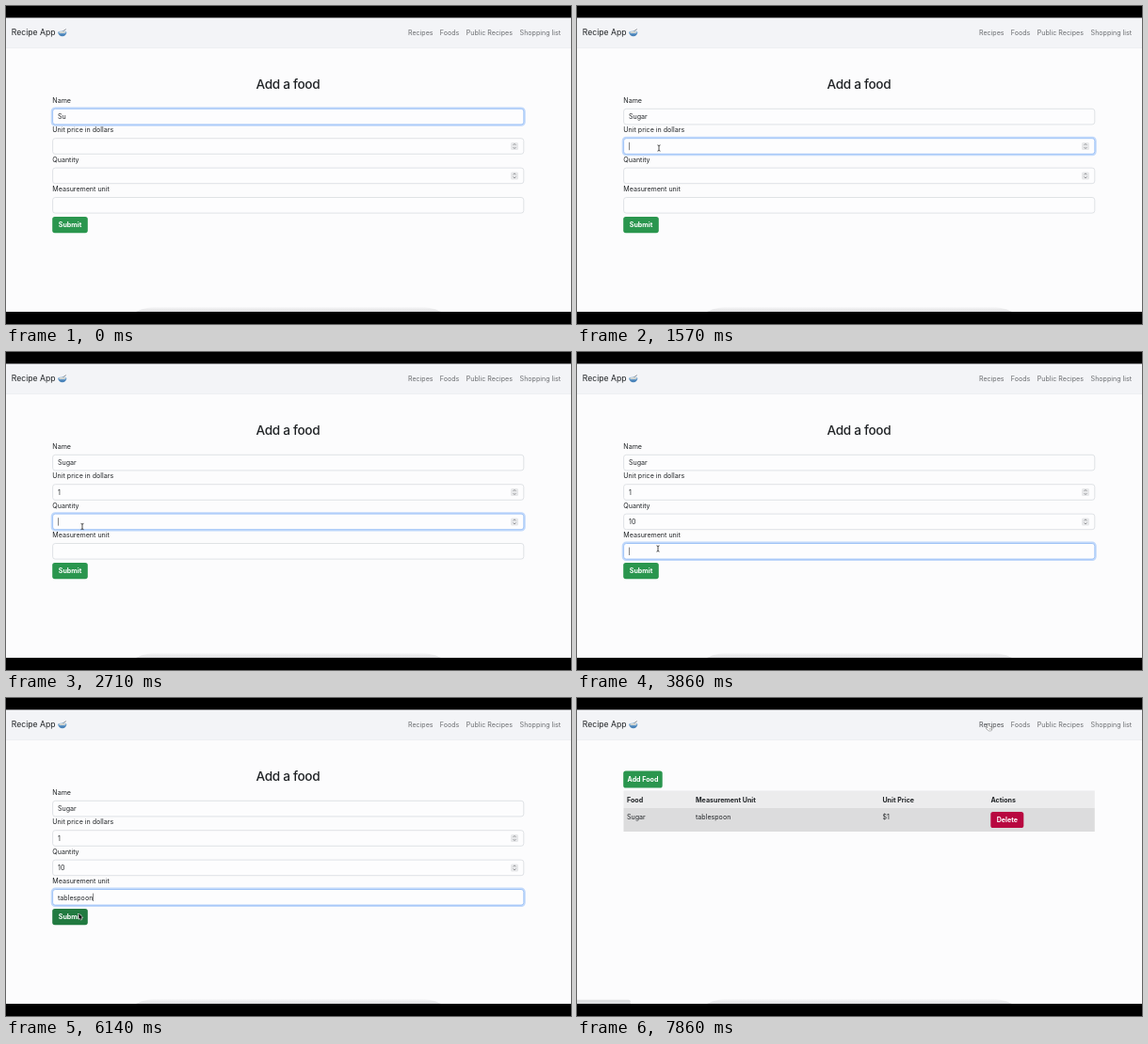
An HTML page with a canvas for the animation above (8000 ms loop, 600 by 338 pixels).

```html
<!DOCTYPE html>
<html lang="en">
<head>
<meta charset="utf-8">
<title>Recipe App</title>
<style>
html, body { margin: 0; width: 100%; height: 100%; overflow: hidden; background: #000; }
canvas { display: block; width: 600px; height: 338px; }
</style>
</head>
<body>
<canvas id="stage"></canvas>
<script>
const W = 600, H = 338, LOOP = 8000, STEP = 1000 / 7;
const canvas = document.getElementById('stage');
const ratio = window.devicePixelRatio || 1;
canvas.width = W * ratio;
canvas.height = H * ratio;
const ctx = canvas.getContext('2d');
ctx.scale(ratio, ratio);

const GREEN = '#2a964e', GREEN_DARK = '#217a40', RED = '#b80840', INK = '#212427';
const PAGE_SWITCH = 6290;

// Each field: label, vertical centre, focus interval, and [time, value] keystrokes.
const fields = [
  { label: 'Name', y: 117.6, from: 0, to: 1570,
    keys: [[0, 'Su'], [140, 'Sug'], [290, 'Suga'], [430, 'Sugar']] },
  { label: 'Unit price in dollars', y: 149, from: 1570, to: 2710, spinner: true,
    keys: [[0, ''], [1860, '1']] },
  { label: 'Quantity', y: 180.4, from: 2710, to: 3860, spinner: true,
    keys: [[0, ''], [3000, '1'], [3140, '10']] },
  { label: 'Measurement unit', y: 211.8, from: 3860, to: PAGE_SWITCH,
    keys: [[0, ''], [4140, 't'], [4430, 'ta'], [4570, 'tab'], [4710, 'tabl'], [5000, 'table'],
      [5140, 'tables'], [5290, 'tablesp'], [5430, 'tablespo'], [5570, 'tablespoon']] }
];

const caretOff = [[0, 140], [1290, 1570]];

// [time, x, y, shape]; the shape holds until the next point.
const pointer = [
  [0, 84, 172, null], [710, 84, 174, 'beam'], [1140, 87, 151, 'beam'], [1860, 87, 151, null],
  [2140, 86, 156, 'beam'], [2570, 81, 185.5, 'beam'], [3000, 81, 185.5, null],
  [3430, 82, 187, 'beam'], [3720, 86, 209, 'beam'], [4140, 86, 209, null],
  [5710, 86, 213, 'beam'], [5860, 82, 225, 'arrow'], [6000, 77.3, 229, 'arrow'],
  [6570, 77.3, 229, 'arrow'], [7140, 400, 90, 'arrow'], [7290, 455, 45, 'arrow'],
  [7430, 467, 32, 'hand'], [7710, 438, 31, 'hand'], [7860, 437.3, 31, 'hand'], [8000, 437.3, 31, 'hand']
];

const within = (t, a, b) => t >= a && t < b;
const lastAt = (list, t) => list.filter(entry => entry[0] <= t).pop();

function text(str, x, y, { size = 7.1, weight = 400, color = INK, align = 'left', spacing = 0 } = {}) {
  ctx.font = `${weight} ${size}px Inter, sans-serif`;
  ctx.letterSpacing = spacing + 'px';
  ctx.textAlign = align;
  ctx.fillStyle = color;
  ctx.fillText(str, x, y + size * 0.36);
}

function rect(x, y, w, h, color) {
  ctx.fillStyle = color;
  ctx.fillRect(x, y, w, h);
}

function rounded(x, y, w, h, r, fill, stroke, line = 0.6) {
  ctx.beginPath();
  ctx.roundRect(x, y, w, h, r);
  if (fill) { ctx.fillStyle = fill; ctx.fill(); }
  if (stroke) { ctx.strokeStyle = stroke; ctx.lineWidth = line; ctx.stroke(); }
}

function polyline(points, color, width, close) {
  ctx.beginPath();
  points.forEach(([x, y]) => ctx.lineTo(x, y));
  if (close) ctx.closePath();
  ctx.strokeStyle = color;
  ctx.lineWidth = width;
  ctx.stroke();
}

function button(label, x, y, w, h, color) {
  rounded(x, y, w, h, 2.6, color);
  text(label, x + w / 2, y + h / 2 + 0.2, { weight: 700, color: '#fff', align: 'center' });
}

function drawBowl() {
  polyline([[59.5, 27.5], [63.8, 24.6]], '#8e9297', 1);
  ctx.fillStyle = '#4a83b9';
  ctx.beginPath();
  ctx.ellipse(59.8, 28, 4.5, 4.2, 0, 0, Math.PI);
  ctx.fill();
  ctx.fillStyle = '#7aabd6';
  ctx.beginPath();
  ctx.ellipse(59.8, 27.9, 4.5, 1.5, 0, 0, Math.PI * 2);
  ctx.fill();
  ctx.fillStyle = '#e3ddd0';
  ctx.beginPath();
  ctx.ellipse(59.8, 27.9, 3.5, 0.9, 0, 0, Math.PI * 2);
  ctx.fill();
}

function drawShell(t) {
  rect(0, 0, W, H, '#000');
  rect(0, 12.7, W, 312.3, '#fcfcfd');
  rect(0, 12.7, W, 32, '#f3f4f7');
  rect(0, 44.4, W, 0.5, '#e6e7ea');
  text('Recipe App', 5.8, 28.3, { size: 8.65 });
  drawBowl();
  const links = [['Recipes', 427, 7570], ['Foods', 460.8, 7430], ['Public Recipes', 488.8], ['Shopping list', 545.6]];
  links.forEach(([label, x, hoverAt]) => {
    const hovered = hoverAt && within(t, hoverAt, hoverAt === 7430 ? 7570 : LOOP);
    text(label, x, 28.2, { color: hovered ? '#4b4d50' : '#6b6d70' });
  });
  const shade = ctx.createLinearGradient(0, 319.5, 0, 325);
  shade.addColorStop(0, 'rgba(90,90,95,0)');
  shade.addColorStop(1, 'rgba(90,90,95,.2)');
  ctx.save();
  ctx.beginPath();
  ctx.moveTo(138, 325);
  ctx.quadraticCurveTo(148, 319.5, 165, 319.5);
  ctx.lineTo(435, 319.5);
  ctx.quadraticCurveTo(452, 319.5, 462, 325);
  ctx.fillStyle = shade;
  ctx.fill();
  ctx.restore();
  if (t >= 7430) rounded(-1, 320.8, 57.8, 4.2, [0, 2, 0, 0], '#dddee0');
}

function drawSpinner(y) {
  rounded(536, y - 4, 8, 8, 1.5, '#e7e8ea');
  polyline([[538.6, y - 1.1], [540, y - 2.6], [541.4, y - 1.1]], '#707276', 0.7);
  polyline([[538.6, y + 1.1], [540, y + 2.6], [541.4, y + 1.1]], '#707276', 0.7);
}

function drawField(field, t) {
  const { label, y, spinner } = field;
  const focused = within(t, field.from, field.to);
  const value = lastAt(field.keys, t)[1];
  text(label, 49.3, y - 17.4);
  if (focused) rounded(48.7, y - 9.2, 502, 18.4, 3.4, null, '#c2d9fb', 2);
  rounded(49.6, y - 8.3, 500.2, 16.6, 2.7, '#fdfdfe', focused ? '#8fb9f5' : '#d3d7dc', focused ? 0.8 : 0.7);
  text(value, 55, y + 0.2);
  if (focused && !caretOff.some(([a, b]) => within(t, a, b))) {
    rect(55.1 + ctx.measureText(value).width, y - 4.2, 0.6, 8.4, '#333');
  }
  if (spinner) drawSpinner(y);
}

function drawForm(t) {
  text('Add a food', 299.4, 83, { size: 13.6, weight: 500, align: 'center', spacing: -0.3 });
  fields.forEach(field => drawField(field, t));
  button('Submit', 49.2, 224, 37.6, 17.2, t >= 5860 ? GREEN_DARK : GREEN);
}

function drawTable() {
  button('Add Food', 49.2, 77.5, 41.5, 18, GREEN);
  rect(49.5, 98.5, 500.3, 18.5, '#ececed');
  rect(49.5, 117, 500.3, 25, '#dcdcdd');
  const columns = [[53, 'Food', 'Sugar'], [126, 'Measurement Unit', 'tablespoon'], [324.4, 'Unit Price', '$1'], [439.4, 'Actions', '']];
  columns.forEach(([x, heading, cell]) => {
    text(heading, x, 108.2, { weight: 700 });
    text(cell, x, 126.7);
  });
  button('Delete', 439.3, 121, 35, 17, RED);
}

const shapes = {
  beam() {
    polyline([[-1.5, -3.2], [0, -2.5], [1.5, -3.2]], '#222', 0.8);
    polyline([[0, -2.6], [0, 2.6]], '#222', 0.8);
    polyline([[-1.5, 3.2], [0, 2.5], [1.5, 3.2]], '#222', 0.8);
  },
  arrow() {
    const outline = [[0, 0], [0, 6.1], [1.4, 4.9], [2.4, 7], [3.3, 6.5], [2.4, 4.5], [4.2, 4.4]];
    polyline(outline, '#fff', 1, true);
    ctx.fillStyle = '#111';
    ctx.fill();
  },
  hand() {
    polyline([[-1.7, -3.4], [-0.8, -3.7], [0.2, -0.9], [2.8, -0.3], [3.3, 1.8], [2.5, 3.7],
      [-0.3, 3.7], [-2.7, 1], [-2.1, 0.3], [-0.9, 0.9]], '#222', 0.8, true);
    ctx.fillStyle = '#fff';
    ctx.fill();
    polyline([[0.8, 1], [0.9, 2.6]], '#555', 0.4);
    polyline([[1.9, 1], [1.9, 2.6]], '#555', 0.4);
  }
};

function drawPointer(t) {
  const start = lastAt(pointer, t);
  const end = pointer[pointer.indexOf(start) + 1] || start;
  const [time, x, y, shape] = start;
  if (!shape) return;
  // Stay put when the pointer is about to hide.
  const p = end[3] && end !== start ? (t - time) / (end[0] - time) : 0;
  ctx.save();
  ctx.translate(x + (end[1] - x) * p, y + (end[2] - y) * p);
  ctx.lineJoin = 'round';
  shapes[shape]();
  ctx.restore();
}

function render(now) {
  const elapsed = now % LOOP;
  const t = Math.round(Math.floor((elapsed + 5) / STEP) * STEP / 10) * 10 % LOOP;
  drawShell(t);
  if (t < PAGE_SWITCH) drawForm(t);
  else drawTable();
  drawPointer(t);
}

const begin = performance.now();
function tick() {
  render(performance.now() - begin);
  requestAnimationFrame(tick);
}
tick();
</script>
</body>
</html>
```
